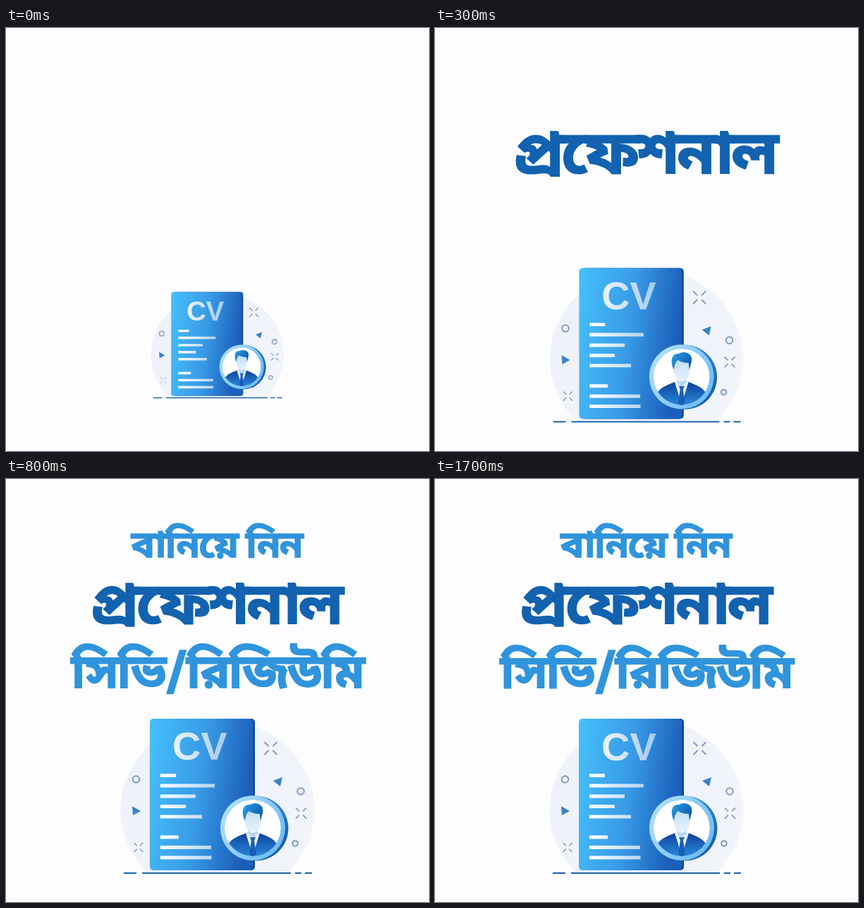
Recreate the animation shown at these times as an HTML page. Size 600 by 600 pixels, loop 1.8 s.

```html
<!DOCTYPE html>
<html lang="bn">
<head>
<meta charset="utf-8">
<title>CV</title>
<style>
  html, body { margin: 0; width: 100%; height: 100%; overflow: hidden; background: #fdfdff; }
  svg { display: block; width: 100%; height: 100%; }
  .line { font-family: 'Noto Sans Bengali', 'Noto Sans', sans-serif; font-weight: 800; font-stretch: semi-condensed; letter-spacing: -.04em; }
  .cv { font: bold 56px 'Liberation Sans', Arial, sans-serif; }
</style>
</head>
<body>
<svg viewBox="0 0 600 600">
  <defs>
    <linearGradient id="blob" x2="1" y2="1"><stop stop-color="#edf1f9"/><stop offset="1" stop-color="#f3f5fb"/></linearGradient>
    <linearGradient id="card" x2="1" y2=".18"><stop stop-color="#46c0fc"/><stop offset=".55" stop-color="#389ae6"/><stop offset="1" stop-color="#1c5fbb"/></linearGradient>
    <linearGradient id="ink" gradientUnits="userSpaceOnUse" x1="219" x2="314"><stop stop-color="#fff"/><stop offset="1" stop-color="#a3caef"/></linearGradient>
    <linearGradient id="edge" x2="1" y2="1"><stop stop-color="#45b4f5"/><stop offset="1" stop-color="#0f4fa8"/></linearGradient>
    <linearGradient id="ring" x2="1" y2=".6"><stop stop-color="#b9e3fc"/><stop offset="1" stop-color="#6fbdf3"/></linearGradient>
    <linearGradient id="hair" x2="1" y2=".6"><stop stop-color="#2aa2ea"/><stop offset="1" stop-color="#0f58ae"/></linearGradient>
    <linearGradient id="face" x2="0" y2="1"><stop stop-color="#c0dcf6"/><stop offset="1" stop-color="#eaf4fd"/></linearGradient>
    <linearGradient id="suit" x2="0" y2="1"><stop stop-color="#0e429a"/><stop offset="1" stop-color="#2c92e4"/></linearGradient>
    <clipPath id="floor"><path d="M150 320H450V557H150z"/></clipPath>
    <clipPath id="disc"><circle cx="350" cy="495" r="40"/></clipPath>
    <path id="spark" d="M-9-9l6 6M9-9l-6 6M-9 9l6-6M9 9l-6-6"/>
  </defs>

  <g id="icon">
    <ellipse cx="300" cy="469.5" rx="137.5" ry="129" fill="url(#blob)" clip-path="url(#floor)"/>
    <g fill="none" stroke="#8099c2" stroke-width="2">
      <use href="#spark" x="375.5" y="382"/>
      <use href="#spark" transform="translate(418.5 474) scale(.85)"/>
      <use href="#spark" transform="translate(188 522.5) scale(.72)"/>
      <circle cx="184.5" cy="426" r="4.8"/>
      <circle cx="418" cy="443" r="4.8"/>
      <circle cx="410" cy="517" r="3.8"/>
    </g>
    <path d="M179 464L191 471 180 477zM379 428L392 423 389 436z" fill="#3a82cc"/>
    <path d="M167 559H185M193 559H404M410 559H419M424 559H434" stroke="#1863aa" stroke-width="2.2"/>

    <rect x="208" y="340" width="145" height="215" rx="5" fill="#0c439c"/>
    <rect x="204" y="340" width="146.500" height="215" rx="5" fill="url(#card)"/>
    <text class="cv" x="236" y="398.500" fill="url(#ink)">CV</text>
    <path d="M219 420.500H241M219 435H296M219 450H269M219 464.500H255M219 479H278M219 508H245M219 522.500H291M219 537H291.500"
      stroke="url(#ink)" stroke-width="5"/>

    <circle cx="354.500" cy="495.500" r="46" fill="url(#edge)"/>
    <circle cx="350" cy="495" r="46" fill="url(#ring)"/>
    <g clip-path="url(#disc)">
      <circle cx="350" cy="495" r="40" fill="#fff"/>
      <path d="M312 540C312 514 318 511 341 502L350 508 359 502C382 511 388 514 388 540z" fill="url(#suit)"/>
      <path d="M340 502L350 534 360 502z" fill="#e6f2fd"/>
      <path d="M346 508H354L352 513 355 532 350 538 345 532 348 513z" fill="#1a5fb4"/>
      <path d="M343 492H357V503L350 509 343 503z" fill="#b5d6f4"/>
      <path d="M339 470H361V488C361 496 355 502 350 502S339 496 339 488z" fill="url(#face)"/>
      <path d="M339 485C333 472 336 461 346 462 355 457 367 462 364 474L361 485 360 475Q350 475 345 471 340 474 339 485z" fill="url(#hair)"/>
    </g>
  </g>
</svg>

<script>
const LOOP = 1800, STEP = 100, DECAY = 70;
const LIGHT = '#3094dc', DARK = '#1262b0';
const svg = document.querySelector('svg');
const icon = document.getElementById('icon');
const pen = document.createElement('canvas').getContext('2d');
pen.font = "800 semi-condensed 100px 'Noto Sans Bengali', 'Noto Sans', sans-serif";
pen.letterSpacing = '-4px';

// box: resting centre x, y and width
const lines = [
  { text: 'বানিয়ে নিন', box: [300, 87, 246], color: LIGHT, start: 600, extra: .073 },
  { text: 'প্রফেশনাল', box: [302, 178.5, 358], color: DARK, start: 200, extra: .2 },
  { text: 'সিভি/রিজিউমি', box: [301, 269.5, 420], color: LIGHT, start: 400, extra: .25 }
];

// Sizes the text from its measured ink and centres it on the group's origin
function addLine(line) {
  const m = pen.measureText(line.text);
  const k = line.box[2] / (m.actualBoundingBoxLeft + m.actualBoundingBoxRight + 3);
  const x = (m.actualBoundingBoxLeft - m.actualBoundingBoxRight) / 2 * k;
  const y = (m.actualBoundingBoxAscent - m.actualBoundingBoxDescent) / 2 * k;
  line.group = document.createElementNS(svg.namespaceURI, 'g');
  line.group.innerHTML = `<text class="line" x="${x}" y="${y}" font-size="${100 * k}"
    fill="${line.color}" stroke="${line.color}" stroke-width="${3 * k}">${line.text}</text>`;
  svg.append(line.group);
}

const settle = ms => Math.exp(-ms / DECAY);

function draw() {
  const t = Math.floor(performance.now() % LOOP / STEP) * STEP;
  icon.setAttribute('transform', `translate(300 449.5) scale(${1 - .315 * settle(t)}) translate(-300 -449.5)`);
  for (const { group, box: [x, y], start, extra } of lines) {
    group.setAttribute('visibility', t < start ? 'hidden' : 'visible');
    group.setAttribute('transform', `translate(${x} ${y}) scale(${1 + extra * settle(t - start)})`);
  }
  requestAnimationFrame(draw);
}

lines.forEach(addLine);
draw();
</script>
</body>
</html>
```
